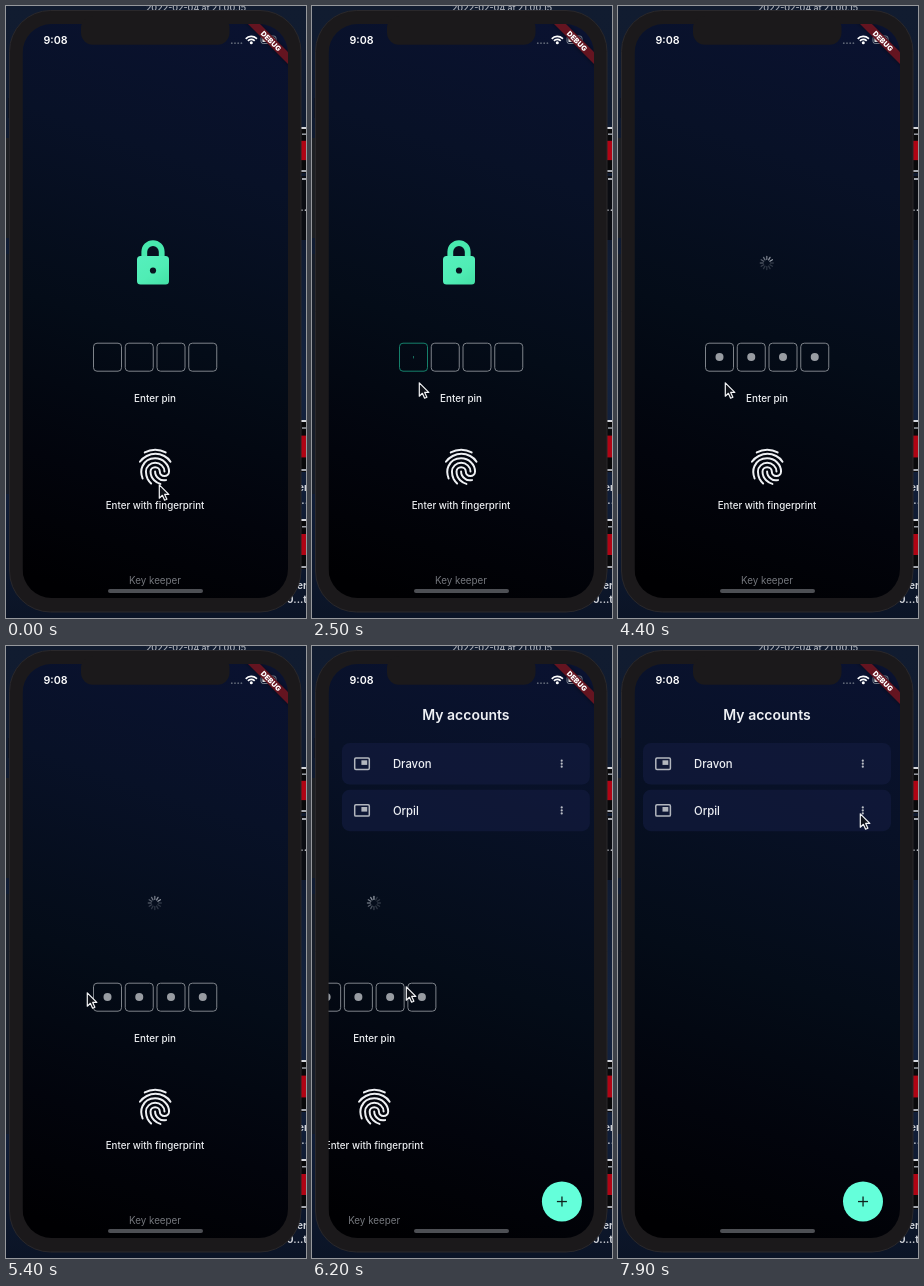
Write an HTML page with a canvas that moves like this. It is 300 px wide and 612 px high and loops after 8 s.

```html
<!DOCTYPE html>
<html lang="en">
<head>
<meta charset="utf-8">
<title>Pin entry</title>
<style>
html, body { margin: 0; width: 100%; height: 100%; overflow: hidden; background: #0b1424; }
canvas { display: block; width: 300px; height: 612px; }
</style>
</head>
<body>
<canvas id="stage"></canvas>
<script>
const LOOP = 8000;
const canvas = document.getElementById('stage');
const ctx = canvas.getContext('2d');
const dpr = window.devicePixelRatio || 1;
canvas.width = 300 * dpr;
canvas.height = 612 * dpr;

const SCREEN = { x: 16.5, y: 18, w: 265.5, h: 574 };
const FIELD = { x: 87.5, y: 337, size: 28, pitch: 31.75 };
const FOCUS_AT = 1100, TYPE_AT = 3580, TYPE_GAP = 160, LOAD_AT = 4220;
const PUSH_AT = 5905, PUSH_MS = 400;

// time, x, y of the pointer tip
const POINTER = [
  [0, 153, 479], [100, 153, 479], [750, 104, 359], [1850, 104, 359],
  [2350, 107, 377], [4500, 107, 377], [4800, 69, 353], [5000, 69, 353],
  [5400, 81, 347], [5900, 81, 347], [6200, 94, 341], [6700, 150, 292],
  [7550, 242, 168], [LOOP, 242, 168]
];

// ridges on a 24 unit grid
const RIDGES = [
  'M17.8 4C16 3 14 2.5 12 2.5S8 3 6.2 4',
  'M3.5 9.2C4.5 7.8 5.9 6.7 7.3 6C10.3 4.5 14 4.5 17 6C18.4 6.7 19.6 7.8 20.5 9.2',
  'M9.75 21.3C8.9 20.5 8.4 19.9 7.8 18.8C7.2 17.6 6.85 16.2 6.85 14.66C6.85 12 9.2 9.77 12 9.77S17.16 12 17.16 14.66',
  'M18 19.4C16.3 19.7 15 19.4 14.1 18.6C12.7 17.7 11.94 16.2 11.94 14.66',
  'M14.9 21.5C13.4 21.1 12.4 20.5 11.4 19.5C10.1 18.2 9.4 16.5 9.4 14.66C9.4 13.3 10.5 12.2 11.97 12.2'
    + 'S14.55 13.3 14.55 14.66C14.55 16 15.7 17.1 17.1 17.1S19.7 16 19.7 14.66'
    + 'C19.7 10.6 16.2 7.3 11.95 7.3C8.9 7.3 6.1 9 4.9 11.7C4.1 13.4 4 15.8 5 18.5'
].map(d => new Path2D(d));

const clamp = v => Math.max(0, Math.min(1, v));
const lerp = (a, b, k) => a + (b - a) * k;
const smooth = k => k * k * (3 - 2 * k);

function bezierEase(x1, y1, x2, y2, x) {
  const at = (a, b, s) => 3 * (1 - s) * (1 - s) * s * a + 3 * (1 - s) * s * s * b + s * s * s;
  let lo = 0, hi = 1;
  for (let i = 0; i < 24; i++) {
    const mid = (lo + hi) / 2;
    if (at(x1, x2, mid) < x) lo = mid; else hi = mid;
  }
  return at(y1, y2, lo);
}

function box(x, y, w, h, r) {
  ctx.beginPath();
  ctx.roundRect(x, y, w, h, r);
}

function rect(x, y, w, h, color) {
  ctx.fillStyle = color;
  ctx.fillRect(x, y, w, h);
}

function disc(x, y, r, color) {
  ctx.fillStyle = color;
  ctx.beginPath();
  ctx.arc(x, y, r, 0, Math.PI * 2);
  ctx.fill();
}

function label(text, x, y, size, weight, color, align = 'center') {
  ctx.font = `${weight} ${size}px Inter, sans-serif`;
  ctx.textAlign = align;
  ctx.fillStyle = color;
  ctx.fillText(text, x, y);
}

function gradient(x1, y1, x2, y2, stops) {
  const g = ctx.createLinearGradient(x1, y1, x2, y2);
  stops.forEach(([at, color]) => g.addColorStop(at, color));
  return g;
}

function thumbnail(y, h) {
  rect(293, y, 7, h, '#08080a');
  rect(294, y, 6, 2, '#d4d6dc');
  rect(295, y + h * 0.3, 5, h * 0.42, '#b00414');
  rect(296, y + h * 0.14, 4, 1.5, '#9a9ea6');
  rect(294, y + h - 3, 6, 2, '#a4a7ae');
}

function drawDesktop() {
  rect(0, 0, 300, 612, gradient(0, 0, 0, 612, [
    [0, '#111c30'], [0.35, '#0f1a30'], [0.6, '#14233f'], [0.8, '#101d37'], [1, '#0b1426']
  ]));
  rect(0, 132, 5, 100, '#1d1f23');
  rect(0, 248, 5, 240, '#161c28');
  label('2022-02-04 at 21.00.15', 190, 5, 8.8, 600, '#a2a7b0');
  thumbnail(121, 46);
  rect(294, 170, 6, 64, '#0a0c12');
  rect(296, 172, 4, 2, '#a4a7ae');
  label('..', 301, 205, 10, 700, '#c6c9d0', 'right');
  thumbnail(414, 52);
  thumbnail(513, 50);
  label('er', 302, 485, 10, 700, '#d0d3d9', 'right');
  label('..', 302, 498, 10, 700, '#d0d3d9', 'right');
  label('er', 301, 583, 10, 700, '#d0d3d9', 'right');
  label('0...t', 301, 597, 10, 700, '#d0d3d9', 'right');
}

function drawBody() {
  rect(2.5, 92, 3, 20, '#111014');
  box(3.5, 4.5, 291.5, 601.5, 41);
  ctx.fillStyle = '#1b191b';
  ctx.fill();
  ctx.strokeStyle = '#2a282b';
  ctx.lineWidth = 1;
  ctx.stroke();
}

function drawLock() {
  ctx.strokeStyle = '#48e9ae';
  ctx.lineWidth = 5.8;
  ctx.beginPath();
  ctx.moveTo(138.3, 253);
  ctx.lineTo(138.3, 245.8);
  ctx.arc(147, 245.8, 8.7, Math.PI, 0);
  ctx.lineTo(155.7, 253);
  ctx.stroke();
  box(131, 250, 32, 28.5, 3.5);
  ctx.fillStyle = gradient(137, 250, 157, 279, [[0, '#55efbc'], [0.55, '#50edb5'], [1, '#46e2a8']]);
  ctx.fill();
  disc(147, 264.5, 3.1, '#08131f');
}

function drawSpinner(t) {
  const active = Math.floor(((t + 840) % 1000) / 1000 * 12);
  ctx.lineWidth = 1.3;
  ctx.lineCap = 'round';
  for (let i = 0; i < 12; i++) {
    const age = (active - i + 12) % 12;
    const a = i * Math.PI / 6 - Math.PI / 2;
    const c = Math.cos(a), s = Math.sin(a);
    ctx.strokeStyle = `rgba(225,230,238,${Math.max(0.18, 0.65 - age * 0.07)})`;
    ctx.beginPath();
    ctx.moveTo(148.8 + c * 3.6, 257 + s * 3.6);
    ctx.lineTo(148.8 + c * 6.5, 257 + s * 6.5);
    ctx.stroke();
  }
  ctx.lineCap = 'butt';
}

function drawFingerprint() {
  ctx.save();
  ctx.translate(149.2, 460.8);
  ctx.scale(1.8, 1.8);
  ctx.translate(-12, -12);
  ctx.strokeStyle = '#eef0f3';
  ctx.lineWidth = 1.1;
  ctx.lineCap = 'round';
  RIDGES.forEach(ridge => ctx.stroke(ridge));
  ctx.restore();
}

function drawFields(t) {
  const { x: left, y, size, pitch } = FIELD;
  const typed = Math.max(0, Math.min(4, Math.floor((t - TYPE_AT) / TYPE_GAP) + 1));
  for (let i = 0; i < 4; i++) {
    const x = left + i * pitch;
    const focused = t >= FOCUS_AT && t < LOAD_AT && i === Math.min(typed, 3);
    box(x, y + 0.2, size, size, 3.5);
    ctx.lineWidth = 1;
    ctx.strokeStyle = focused ? '#15806b' : '#7e838a';
    ctx.stroke();
    if (i < typed) disc(x + 14, 351, 4, '#989ca2');
    else if (focused && t % 1000 >= 400) rect(x + 13.5, 350, 1, 2.4, '#176b5c');
  }
}

function drawPinPage(t) {
  if (t < LOAD_AT) drawLock(); else drawSpinner(t);
  drawFields(t);
  label('Enter pin', 149, 395.7, 9.9, 500, '#eef0f3');
  drawFingerprint();
  label('Enter with fingerprint', 149, 502.7, 9.75, 500, '#eef0f3');
  label('Key keeper', 149, 578.3, 9.8, 400, '#74777d');
}

function drawCard(y, name) {
  box(25, y, 248, 41.5, 8);
  ctx.fillStyle = 'rgba(18,27,62,.68)';
  ctx.fill();
  const mid = y + 20.7;
  box(37.8, mid - 5.7, 14.6, 11.4, 1.2);
  ctx.lineWidth = 1.5;
  ctx.strokeStyle = '#b2b6be';
  ctx.stroke();
  rect(44.5, mid - 3.4, 5.8, 4.6, '#b2b6be');
  label(name, 76, mid + 4.2, 11.3, 500, '#eef0f4', 'left');
  [-3, 0, 3].forEach(d => disc(244.8, mid + d, 1.1, '#b9bdc5'));
}

function drawAccounts() {
  label('My accounts', 149, 74, 14, 600, '#eef0f4');
  drawCard(97, 'Dravon');
  drawCard(143.7, 'Orpil');
  disc(245, 555.5, 20, '#64ffda');
  rect(240, 554.9, 10, 1.3, '#10231f');
  rect(244.4, 550.5, 1.3, 10, '#10231f');
}

function drawStatus() {
  label('9:08', 49.5, 37.9, 10.7, 600, '#fff');
  for (let i = 0; i < 4; i++) disc(225.8 + i * 3.2, 37.2, 0.9, '#5c6474');
  ctx.strokeStyle = '#fff';
  ctx.lineWidth = 1.7;
  [4.6, 7.6].forEach(r => {
    ctx.beginPath();
    ctx.arc(245.3, 38, r, -Math.PI * 0.76, -Math.PI * 0.24);
    ctx.stroke();
  });
  disc(245.3, 36.8, 1.5, '#fff');
  box(255, 30, 15, 7.5, 2.2);
  ctx.lineWidth = 0.9;
  ctx.strokeStyle = '#9097a3';
  ctx.stroke();
  box(256.4, 31.4, 12.2, 4.7, 1.2);
  ctx.fillStyle = '#fff';
  ctx.fill();
}

function drawBanner() {
  ctx.save();
  ctx.translate(282, 18);
  ctx.rotate(Math.PI / 4);
  ctx.shadowColor = 'rgba(0,0,0,.5)';
  ctx.shadowBlur = 4;
  rect(-40, 19.8, 80, 8.5, '#641420');
  ctx.shadowBlur = 0;
  label('DEBUG', 0, 26.7, 7.2, 900, '#fff');
  ctx.restore();
}

function drawScreen(t) {
  const { x, y, w, h } = SCREEN;
  ctx.save();
  box(x, y, w, h, 29);
  ctx.clip();
  rect(x, y, w, h, gradient(245, 18, 55, 580, [
    [0, '#0a1230'], [0.25, '#081127'], [0.55, '#040c18'], [0.8, '#02040c'], [1, '#000002']
  ]));

  const k = clamp((t - PUSH_AT) / PUSH_MS);
  const push = k === 0 ? 0 : k === 1 ? 1 : bezierEase(0.35, 0.91, 0.33, 0.97, k);
  if (k < 1) {
    ctx.save();
    ctx.translate(-push * w / 3, 0);
    drawPinPage(t);
    ctx.restore();
  }
  if (k > 0) {
    ctx.save();
    ctx.translate((1 - push) * w, 0);
    drawAccounts();
    ctx.restore();
  }

  drawStatus();
  drawBanner();
  box(102, 583, 95, 4, 2);
  ctx.fillStyle = '#4d4f54';
  ctx.fill();
  ctx.restore();

  box(75, 10, 148.5, 28.7, 12);
  ctx.fillStyle = '#1b191b';
  ctx.fill();
}

function drawPointer(t) {
  const i = POINTER.findIndex(p => p[0] > t);
  const [t0, x0, y0] = POINTER[i - 1], [t1, x1, y1] = POINTER[i];
  const k = smooth((t - t0) / (t1 - t0));
  ctx.save();
  ctx.translate(lerp(x0, x1, k) - 0.3, lerp(y0, y1, k) - 1);
  const arrow = new Path2D('M.6.8V14.2L3.7 11.3 5.9 16.2 8.2 15.2 6 10.4H10.1Z');
  ctx.fillStyle = '#10131a';
  ctx.fill(arrow);
  ctx.strokeStyle = '#f2f3f5';
  ctx.lineWidth = 1.2;
  ctx.lineJoin = 'round';
  ctx.stroke(arrow);
  ctx.restore();
}

function render(now) {
  const t = now % LOOP;
  ctx.setTransform(dpr, 0, 0, dpr, 0, 0);
  drawDesktop();
  drawBody();
  drawScreen(t);
  drawPointer(t);
  requestAnimationFrame(render);
}
requestAnimationFrame(render);
</script>
</body>
</html>
```
